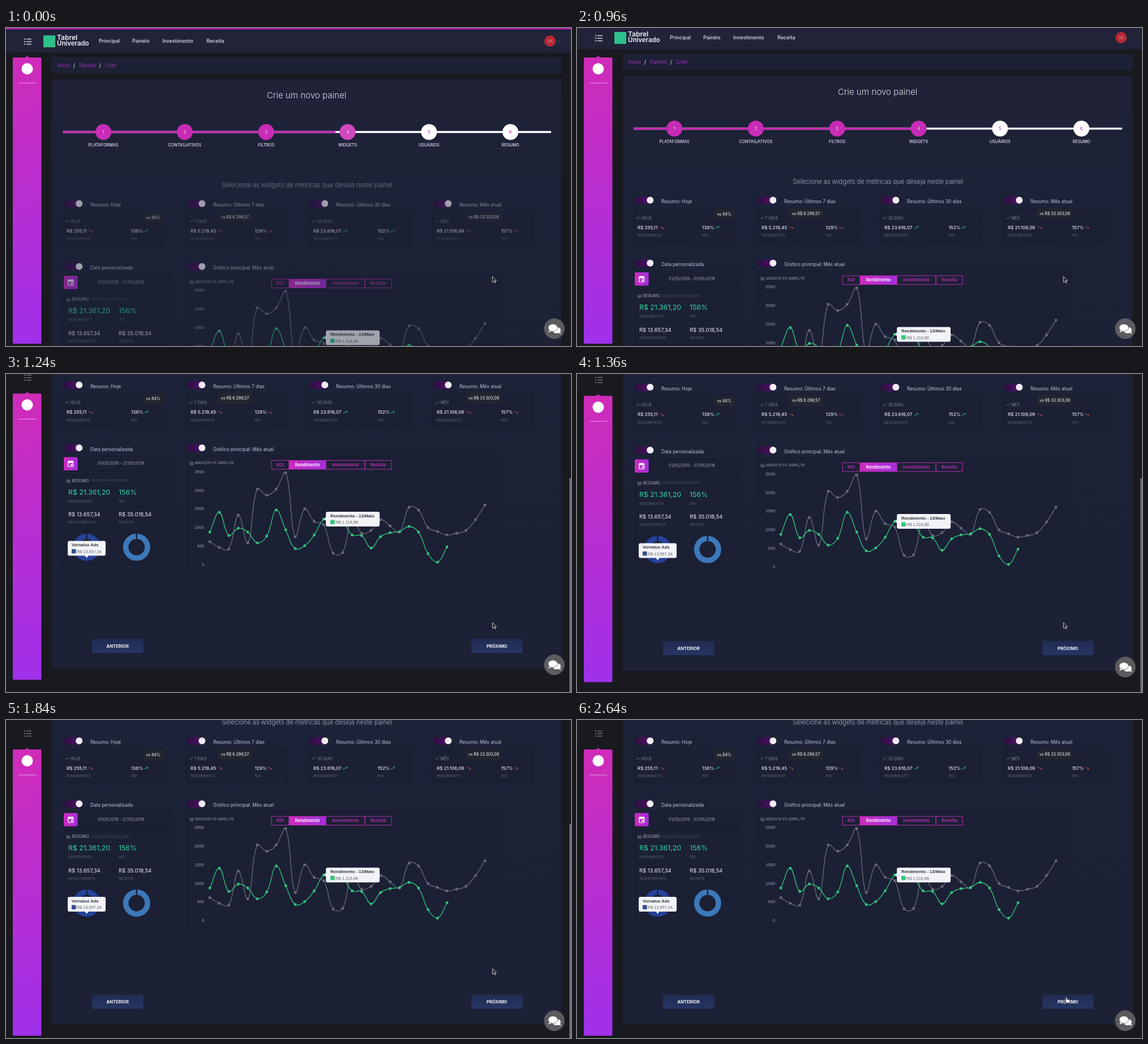
Recreate the animation shown at these times as an HTML page. Size 998 by 561 pixels, loop 2.92 s.

```html
<!DOCTYPE html>
<html lang="pt">
<head>
<meta charset="utf-8">
<title>Criar painel</title>
<style>
html, body { margin: 0; width: 100%; height: 100%; overflow: hidden; background: #191a20; }
svg { display: block; width: 998px; height: 561px; }
text { font-family: Inter, "Open Sans", sans-serif; white-space: pre; }
text.plain { font-family: "Liberation Sans", Arial, sans-serif; }
</style>
</head>
<body>
<svg id="stage" viewBox="0 0 998 561" xmlns="http://www.w3.org/2000/svg">
  <defs>
    <linearGradient id="side" x2="0" y2="1"><stop stop-color="#cf2cb8"/><stop offset="1" stop-color="#9f30ea"/></linearGradient>
    <linearGradient id="pink" x2="1" y2="0"><stop stop-color="#cc2bbf"/><stop offset="1" stop-color="#a42fdd"/></linearGradient>
    <linearGradient id="track" x2="1" y2="0"><stop stop-color="#2b0d40"/><stop offset="1" stop-color="#531369"/></linearGradient>
    <linearGradient id="btn" x2="0" y2="1"><stop stop-color="#212c52"/><stop offset="1" stop-color="#263563"/></linearGradient>
    <linearGradient id="panel" x2="0" y2="1"><stop stop-color="#202238"/><stop offset=".25" stop-color="#1c2237"/><stop offset="1" stop-color="#1c2136"/></linearGradient>
  </defs>
  <g id="dock"></g>
  <g id="page"></g>
  <g id="fixed"></g>
  <rect id="thumb" x="995" width="3" height="377" fill="#6a6b73"/>
  <g id="cursor">
    <path id="arrow" d="M0 0V9.6L2.3 7.6L3.8 11L5.5 10.3L4 7H7Z" fill="#15161c" stroke="#e8e8ee" stroke-width=".9"/>
    <path id="hand" d="M2 0.6q1.2-1.2 2 .2V4l4 .9q1.4.4 1.2 2l-.7 3.6H3.2L0 6.6q.3-1.4 2 0Z" fill="#f4f4f6" stroke="#22242e" stroke-width=".7"/>
  </g>
</svg>
<script>
const $ = id => document.getElementById(id);
const MAGENTA = '#c82bb5', GREEN = '#35c47c', RED = '#bf504f', DIM = '#5c5f70', SOFT = '#85879a';

// Text is placed by its vertical centre.
function txt(x, y, s, size, fill = '#e4e4ec', o = {}) {
  return `<text x="${x}" y="${y + size * .36}" font-size="${size}" fill="${fill}" font-weight="${o.w || 400}"` +
    ` text-anchor="${o.a || 'start'}" class="${o.plain ? 'plain' : ''}">${s}</text>`;
}
const mid = (x, y, s, size, fill, w) => txt(x, y, s, size, fill, { a: 'middle', w });
const box = (x, y, w, h, fill, extra = '') => `<rect x="${x}" y="${y}" width="${w}" height="${h}" fill="${fill}" ${extra}/>`;
const dot = (x, y, r, fill, extra = '') => `<circle cx="${x}" cy="${y}" r="${r}" fill="${fill}" ${extra}/>`;
const path = (d, stroke, w = 1, fill = 'none') => `<path d="${d}" stroke="${stroke}" stroke-width="${w}" fill="${fill}"/>`;
const card = (x, y, w, h) => box(x, y, w, h, '#1b2035', 'stroke="#181b2c"');

function burger(color) {
  return [19.5, 24, 28.5].map(y => box(32, y - 1, 2.2, 2, color) + box(36, y - .8, 9, 1.6, color)).join('');
}
function trend(x, y, up) {
  const k = up ? -1 : 1;
  return path(`M${x} ${y - 2 * k}l2.5 ${2 * k}l1.5 ${-k}l3.5 ${3 * k}m-2.3 0h2.3v${-2.3 * k}`, up ? GREEN : RED, .9);
}
function toggle(x, y, label) {
  return box(x + 1, y - 6.5, 32, 13, 'url(#track)', 'rx="6.5"') + dot(x + 28.2, y - .2, 6, '#f0eef4') +
    txt(x + 48, y + 2.5, label, 8.25, '#c4c5d1');
}
const chartIcon = (x, y) => path(`M${x} ${y - 3}v6h6.5M${x + 2} ${y + 2}v-3m2 3v-4.5m2 4.5v-3`, SOFT, .9);

function header() {
  const menu = [[164, 'Principal'], [223, 'Painéis'], [276, 'Investimento'], [354, 'Receita']];
  return box(0, 0, 998, 43.5, '#212339') + box(0, 0, 998, 2.5, '#b722ac') + burger('#c9cad2') +
    box(66, 13, 21, 21, '#2fbf88') +
    txt(90, 16.5, 'Tabrel', 12, '#f2f2f6', { w: 600 }) + txt(90, 27, 'Univerado', 11.4, '#f2f2f6', { w: 600 }) +
    menu.map(([x, s]) => txt(x, 23, s, 8.9, '#e4e4ec', { w: 500 })).join('') +
    dot(961, 23, 10, '#b32a35') + mid(961, 23, 'VA', 7, '#dd8f95') +
    path('M975 22.3l1.8 1.8l1.8-1.8', '#555768', .9) +
    box(81, 52, 900, 28.5, '#1d2135') +
    [[91, 'Início'], [129, 'Painéis'], [175, 'Criar']].map(([x, s]) => txt(x, 66, s, 8.9, '#a52fbe')).join('') +
    txt(118.5, 66, '/', 10) + txt(164.5, 66, '/', 10);
}

function stepper() {
  const names = ['PLATAFORMAS', 'CONTAS/ATIVOS', 'FILTROS', 'WIDGETS', 'USUÁRIOS', 'RESUMO'];
  return mid(531, 119, 'Crie um novo painel', 15.1, '#dedfe7', 300) +
    box(100, 181.7, 863, 3.6, '#fff', 'rx="1"') +
    box(100, 181.7, 482, 3.6, MAGENTA, 'id="bar"') +
    names.map((s, i) => {
      const x = 172 + i * 143.8, on = i < 4;
      return dot(x, 183.5, 14, on ? MAGENTA : '#fff', i == 3 ? 'id="step"' : '') +
        mid(x, 183.5, i + 1, 8, on ? '#f3d9f2' : MAGENTA) + mid(x, 206, s, 7.2, '#e6e6ee', 500);
    }).join('');
}

function summaries() {
  const rows = [
    [101, 6, 'Hoje', 'HOJE', 'R$ 255,11', 0, '138%', 1, 'vs 84%', 260, 334.5, 36],
    [318, 8, 'Últimos 7 dias', '7 DIAS', 'R$ 5.219,45', 0, '129%', 0, 'vs R$ 6.296,57', 404.5, 333.5, 62],
    [535, 8, 'Últimos 30 dias', '30 DIAS', 'R$ 23.616,07', 1, '152%', 1],
    [753, 8, 'Mês atual', 'MÊS', 'R$ 21.106,09', 0, '157%', 0, 'vs R$ 33.303,08', 844, 333.3, 64]
  ];
  return rows.map(([x, pad, label, head, money, up, pct, up2, tip, tx, ty, tw]) => {
    const l = x + pad, r = x + (pad == 6 ? 120 : 121.5);
    const end = l + { 9: 38, 11: 48, 12: 52 }[money.length];
    return toggle(x, 310, 'Resumo: ' + label) + card(x, 325, pad == 6 ? 177 : 179, 58.5) +
      path(`M${l - 2} 343l2-2.5l1.5 1l2.5-3`, SOFT, .8) + txt(l + 6.5, 341, head, 7, SOFT) +
      txt(l, 358, money, 8, '#e6e6ee', { w: 500 }) + trend(end, 358, up) +
      txt(r, 358, pct, 8, '#e6e6ee', { w: 500 }) + trend(r + 22, 358, up2) +
      txt(l, 372, 'RENDIMENTO', 6.4, DIM) + txt(r, 372, 'ROI', 6.4, DIM) +
      (tip ? box(tx - tw / 2, ty - 9, tw, 18, '#23262f', 'rx="2"') + mid(tx, ty, tip, 6.9, '#e2e2e8', 500) : '');
  }).join('');
}

function donut(x, color) {
  return dot(x, 596, 19.2, 'none', `stroke="${color}" stroke-width="9.6"`) + box(x - 1.2, 571, 2.4, 12, '#1b2035');
}
function tooltip(x, y, w, title, value, color, inset) {
  return box(x, y, w, 26, '#f2f3f6', 'rx="3"') +
    txt(x + inset, y + 7, title, 7.5, '#33353d', { w: 700, plain: 1 }) +
    box(x + inset, y + 14.5, 7.5, 7.5, color) + txt(x + inset + 9, y + 18.4, value, 7.3, '#62646c', { plain: 1 });
}

function custom() {
  const pair = (y, a, b, size, c, w) => txt(110, y, a, size, c, { w }) + txt(199, y, b, size, c, { w });
  return toggle(101, 421, 'Data personalizada') + card(102, 436, 185, 26) + card(102, 467, 185, 161) +
    box(102, 437, 24.5, 23.5, 'url(#pink)', 'rx="2"') +
    box(109.7, 444.7, 9, 9.3, 'none', 'rx="1" stroke="#fff" stroke-width="1.2"') +
    box(109.5, 444.5, 9.5, 3, '#fff') + box(111, 443, 1.4, 2, '#fff') + box(116, 443, 1.4, 2, '#fff') +
    box(114.5, 449.5, 2.8, 2.8, '#fff') +
    txt(162, 448, '01/05/2019 - 27/05/2019', 7, '#a2a4b2') +
    chartIcon(107.5, 478.5) + txt(116.5, 478.5, 'RESUMO', 7, SOFT, { w: 600 }) +
    txt(151, 478.7, '01/05/2019 A 27/05/2019', 5.5, '#4f5262') +
    pair(499, 'R$ 21.361,20', '156%', 12.3, '#2fd6a3') + pair(515, 'RENDIMENTO', 'ROI', 6.4, DIM) +
    pair(538.5, 'R$ 13.657,34', 'R$ 35.018,54', 9.45, '#ececf2') + pair(552.5, 'INVESTIMENTO', 'RECEITA', 6.4, DIM) +
    donut(142.5, '#26429b') + donut(230.7, '#3d78b8') +
    '<path d="M139 610.5h7l-3.500 4.500z" fill="#f2f3f6"/>' +
    tooltip(109, 585, 67, 'Vornalux Ads', 'R$ 13.657,34', '#324d8f', 7);
}

// Smooth line with dots; heights are measured from a page offset.
function series(ys, color) {
  const p = ys.map((y, i) => [360 + i * 16.76, y + 268.5]);
  const ctl = (i, s) => {
    const a = p[Math.max(i - 1, 0)], b = p[i], c = p[Math.min(i + 1, p.length - 1)];
    const d1 = Math.hypot(b[0] - a[0], b[1] - a[1]), d2 = Math.hypot(c[0] - b[0], c[1] - b[1]);
    const f = .4 * (s < 0 ? d1 : d2) / (d1 + d2) * s;
    return [0, 1].map(k => (b[k] + f * (c[k] - a[k])).toFixed(1));
  };
  let d = 'M' + p[0];
  for (let i = 1; i < p.length; i++) d += `C${ctl(i - 1, 1)} ${ctl(i, -1)} ${p[i]}`;
  return path(d, color, 1.3) + p.map(([x, y]) => dot(x, y, 2.4, color)).join('');
}

function chart() {
  const april = [318, 328, 331, 271, 320, 225, 236, 225, 196, 309, 260, 282, 288, 338, 337, 275, 303, 298, 279, 290,
    301, 257, 262, 293, 300, 306, 303, 298, 279, 253];
  const may = [301, 266, 307, 294, 301, 320, 308, 262, 297, 330, 325, 306, 278, 272, 281, 306, 307, 329, 309, 302,
    300, 291, 301, 339, 354, 327];
  const tabs = [[469, 31, 'ROI'], [500, 65, 'Rendimento'], [565, 69, 'Investimento'], [634, 47, 'Receita']];
  return toggle(318, 421, 'Gráfico principal: Mês atual') + card(319, 435, 554, 205) +
    chartIcon(325, 447.5) + txt(334, 447.5, 'MAIO/19 VS ABRIL/19', 6.7, SOFT, { w: 500 }) +
    tabs.map(([x, w, s], i) => box(x, 443, w, 15.5, i == 1 ? 'url(#pink)' : 'none', 'stroke="#b42bae"') +
      mid(x + w / 2, 450.7, s, 7.6, i == 1 ? '#fff' : '#bd2db3', 600)).join('') +
    [0, 1, 2, 3, 4, 5].map(i => txt(350, 626.5 - i * 32.8, i * 500, 7.7, '#a0a2b0', { a: 'end', plain: 1 })).join('') +
    series(april, '#686a79') + series(may, GREEN) +
    '<path d="M566 543l-4.500 3.500l4.500 3.500z" fill="#f2f3f6"/>' +
    tooltip(565, 533.5, 95, 'Rendimento - 13/Maio', 'R$ 1.216,88', GREEN, 8);
}

const button = (x, s) => box(x, 757.5, 90.5, 25, 'url(#btn)', 'rx="2"') + mid(x + 45, 770.3, s, 7.7, '#f2f2f6', 700);

$('dock').innerHTML = burger('#6a6b74');
$('page').innerHTML = header() + box(81, 91, 900, 719.5, 'url(#panel)') + stepper() + '<g id="widgets">' +
  mid(531.5, 276.7, 'Selecione as widgets de métricas que deseja neste painel', 11.2, '#b2b4c0', 300) +
  summaries() + custom() + chart() + '</g>' + button(152, 'ANTERIOR') + button(822, 'PRÓXIMO');
$('fixed').innerHTML = '<path d="M33.500 52.500l4-3.500l4 3.500z" fill="#cf2cb8"/>' +
  box(12, 52, 50.5, 505, 'url(#side)', 'rx="2"') + dot(37.5, 72, 10, '#fff') + box(22, 96.5, 31, 1, '#e7a3e3') +
  dot(968.5, 530.5, 18.2, '#5c5c60') +
  '<g fill="#fff"><ellipse cx="972.500" cy="533" rx="7.300" ry="5.600"/><path d="M975 536.500l5 3.500l-1.500-6z"/>' +
  '<path d="M961 530l-3 7l7-2.500z"/><ellipse cx="966" cy="528.800" rx="8.300" ry="6.500" stroke="#5c5c60" stroke-width=".8"/></g>';

const LOOP = 2920, TICK = 40, MAX = 273;
const scrollKeys = [[920, 0], [960, 6], [1000, 72], [1040, 162], [1080, 230], [1120, 268.5], [1160, 283], [1200, 289],
  [1240, 290.5], [1280, 290], [1360, 286.5], [1440, 281.8], [1520, 278], [1600, 275.8], [1680, 274.2], [1840, 273]];
const cursorKeys = [[2080, 859.3, 438.7], [2200, 861, 443], [2320, 865, 458], [2440, 867, 474], [2560, 863, 486], [2640, 861.5, 488.5]];
const thumbKeys = [[960, 0], [1000, 1], [1840, 1], [2000, 0]];

function at(keys, t, k = 1) {
  if (t <= keys[0][0]) return keys[0][k];
  for (let i = 1; i < keys.length; i++) {
    const a = keys[i - 1], b = keys[i];
    if (t <= b[0]) return a[k] + (b[k] - a[k]) * (t - a[0]) / (b[0] - a[0]);
  }
  return keys[keys.length - 1][k];
}
const move = (id, x, y) => $(id).setAttribute('transform', `translate(${x} ${y})`);

function draw(now) {
  const t = Math.floor((now % LOOP) / TICK) * TICK;
  const intro = 1 - (1 - Math.min(t / 360, 1)) ** 2;
  $('widgets').setAttribute('opacity', .62 + .38 * intro);
  $('bar').setAttribute('width', 482 + 21 * intro);
  $('step').setAttribute('fill', `rgb(${208 - 8 * intro},${72 - 29 * intro},${190 - 9 * intro})`);

  const y = at(scrollKeys, t), over = Math.max(0, y - MAX);
  move('page', 0, -y);
  move('fixed', 0, -over);
  move('dock', 0, -over);
  $('thumb').setAttribute('y', 184 * Math.min(y / MAX, 1));
  $('thumb').setAttribute('opacity', at(thumbKeys, t));

  const cy = at(cursorKeys, t, 2), hover = cy >= 484;
  move('cursor', at(cursorKeys, t, 1), cy);
  $('arrow').style.display = hover ? 'none' : '';
  $('hand').style.display = hover ? '' : 'none';
}

let start;
function loop(now) {
  start ??= now;
  draw(now - start);
  requestAnimationFrame(loop);
}
draw(0);
requestAnimationFrame(loop);
</script>
</body>
</html>
```
